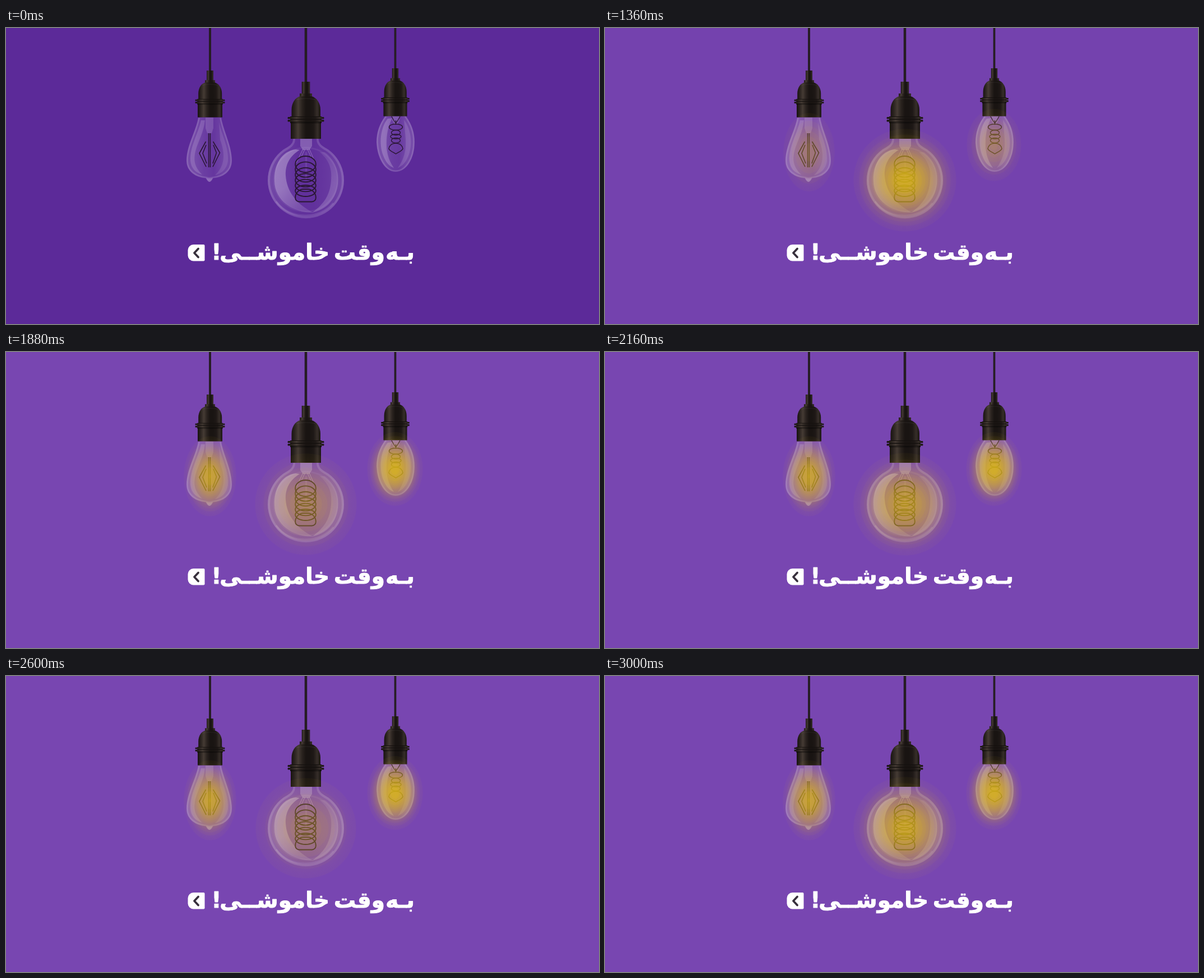
Recreate the animation shown at these times as an HTML page with a canvas. Size 1058 by 529 pixels, loop 3040 ms.

```html
<!DOCTYPE html>
<html lang="fa">
<head>
<meta charset="utf-8">
<title>Lamps</title>
<style>
html, body { margin: 0; width: 100%; height: 100%; overflow: hidden; background: #5c2a99; }
canvas { display: block; width: 100vw; height: 100vh; }
</style>
</head>
<body>
<canvas id="stage" width="1058" height="529"></canvas>
<script>
const ctx = document.getElementById('stage').getContext('2d');
const LOOP = 3040, STEP = 40, SWITCH_ON = 1120;
const DARK = [92, 42, 153], LIGHT = [120, 70, 177], YELLOW = '222,186,20';
// Brightness of the flickering middle lamp: [time, level]
const FLICKER = [[1120, 1], [1360, .9], [1640, .7], [1880, .48], [2160, .74],
  [2320, .88], [2600, .4], [2780, .56], [3000, .83], [3040, .86]];

const clamp = v => Math.max(0, Math.min(1, v));
const mix = (a, b, k) => a + (b - a) * k;
const white = a => `rgba(255,255,255,${a})`;

function keyed(keys, t) {
  for (let i = 1; i < keys.length; i++) {
    const [t0, a] = keys[i - 1], [t1, b] = keys[i];
    if (t <= t1) {
      const k = clamp((t - t0) / (t1 - t0));
      return mix(a, b, k * k * (3 - 2 * k));
    }
  }
  return keys[keys.length - 1][1];
}

function fill(d, style) {
  ctx.fillStyle = style;
  ctx.fill(new Path2D(d));
}

function stroke(d, style, width) {
  ctx.strokeStyle = style;
  ctx.lineWidth = width;
  ctx.stroke(new Path2D(d));
}

function ramp(x0, y0, x1, y1, ...colors) {
  const g = ctx.createLinearGradient(x0, y0, x1, y1);
  colors.forEach((c, i) => g.addColorStop(i / (colors.length - 1), c));
  return g;
}

function ring(x, y, rx, ry, style, width) {
  ctx.beginPath();
  ctx.ellipse(x, y, rx, ry, 0, 0, Math.PI * 2);
  ctx.strokeStyle = style;
  ctx.lineWidth = width;
  ctx.stroke();
}

function metal(w) {
  return ramp(-w, 0, w, 0, '#15100e', '#2a231f', '#453b34', '#2a231f', '#191412',
    '#191412', '#1e1816', '#362e29', '#15100e');
}

function socket(x, top, sx, sy, cord) {
  ctx.fillStyle = ramp(x - cord / 2, 0, x + cord / 2, 0, '#19111a', '#2d2426', '#19111a');
  ctx.fillRect(x - cord / 2, 0, cord, top + 1);
  ctx.save();
  ctx.translate(x, top);
  ctx.scale(sx, sy);
  ctx.fillStyle = metal(8);
  ctx.fillRect(-7.3, 0, 14.6, 22);
  ctx.fillStyle = metal(13);
  ctx.fillRect(-11, 21, 22, 6);
  fill('M-25.5 63V50C-25.5 38 -19 28 -10 26H10C19 28 26 38 26 50V63Z', metal(27));
  stroke('M-17 32Q0 28 17 32', white(.07), 1);
  ctx.fillStyle = '#14100e';
  ctx.fillRect(-28, 62, 56, 12);
  ctx.fillStyle = metal(33);
  ctx.beginPath();
  ctx.roundRect(-32.5, 63, 65, 3.6, 1.5);
  ctx.roundRect(-32.5, 68, 65, 3.6, 1.5);
  ctx.fill();
  ctx.fillStyle = metal(28);
  ctx.fillRect(-27, 72, 54, 30);
  ctx.fillStyle = 'rgba(0,0,0,.35)';
  ctx.fillRect(-27, 72, 54, 2.5);
  ctx.restore();
}

const WIRE = '#2a1733';

function pearLamp() {
  const glass = 'M343 160C339 184 322 210 322 237C322 257 339 267 356 268.5Q360 275 363 275Q366 275 370 268.5C387 267 403 257 403 237C403 210 388 184 384 160Z';
  fill(glass, ramp(322, 0, 403, 0, white(.16), white(.15), white(.09), white(.06), white(.12), white(.15)));
  stroke('M344.5 161C340.5 185 323.5 211 323.5 237C323.5 256 340 265.5 357 267Q363 269 369 267C386 265.5 401.5 256 401.5 237C401.5 211 386.5 185 382.5 161', white(.13), 2.6);
  fill('M348 165C343 189 328 211 329 237C330 251 339 259 350 262C337 249 334 238 338 220C343 202 353 186 355 165Z', white(.15));
  fill('M380 167C384 190 398 213 396 238C394 252 385 260 373 263C390 247 392 226 382 200Z', white(.1));
  fill('M357 268Q363 270 369 268Q366 275 363 275Q360 275 357 268Z', white(.25));
  fill('M356 160H370V179L367 188H359L356 179Z', white(.14));
  stroke('M361.6 188V249M364.4 188V249M356.5 203L345 224L357 248M357 209L351 224L358 242M369.5 203L381.5 223L369 248M370 209L375.5 223L369 242', WIRE, 1.6);
  socket(364, 76, .815, .82, 3.8);
}

function globeLamp() {
  const glass = 'M513 197C513 208 505 211 495 217A68 68 0 1 0 575 217C565 211 557 208 557 197Z';
  fill(glass, ramp(467, 0, 603, 0, white(.15), white(.09), white(.03), white(.03), white(.07), white(.15)));
  stroke('M514 198C514 209 506 213 496 219A66 66 0 1 0 574 219C564 213 556 209 556 198', white(.13), 4);
  ring(535, 271, 57, 57, white(.06), 3);
  fill('M517 217C491 220 478 245 479 274C480 308 511 330 548 330C519 315 501 293 499 264C498 244 506 229 524 218Z',
    ramp(478, 230, 535, 330, white(.3), white(.28), white(.12)));
  fill('M569 222C588 237 594 257 592 278C589 307 571 325 546 330C567 315 578 299 580 273C582 252 577 237 560 222Z',
    ramp(0, 222, 0, 330, white(.08), white(.15), white(.18)));
  stroke('M482 310Q502 336 536 335Q565 334 584 313', white(.1), 3);
  fill('M525 198H546V211L541 218H530L525 211Z', white(.22));
  stroke('M530 216L518 241M533 217L527 230M538 217L544 230M541 216L552 241', white(.3), 1);
  fill('M534 222H537V272H534Z', white(.08));
  for (let i = 0; i < 6; i++) ring(534.5, 243.5 + i * 9.5, 18.3, 14.5 - i * .9, WIRE, 1.9);
  ctx.beginPath();
  ctx.roundRect(516.2, 288, 36.6, 22.5, [15, 15, 7, 7]);
  ctx.stroke();
  socket(535, 96, 1, 1, 4.4);
}

function ovalLamp() {
  const glass = 'M677 157C665 173 661 188 661 204C662 234 677 257 695 257C714 257 729 234 729 204C729 188 725 173 713 157Z';
  fill(glass, ramp(661, 0, 729, 0, white(.18), white(.17), white(.09), white(.07), white(.15), white(.17)));
  stroke('M678 158C666 174 662.5 188 662.5 204C664 233 678 255.5 695 255.5C713 255.5 727.5 233 727.5 204C727.5 188 724 174 712 158', white(.13), 2.5);
  fill('M681 162C668 178 665 207 673 228C678 241 684 247 692 250C681 234 678 218 679 200C680 184 683 174 689 161Z', white(.2));
  fill('M710 164C724 182 727 214 715 235C710 244 704 248 699 250C710 235 714 219 713 199Z', white(.12));
  fill('M689 157H702V165L698 172H693L689 165Z', white(.15));
  stroke('M688 158Q692 166 695.5 170Q699 166 703 158M695.5 165V173', WIRE, 1.3);
  ring(695.5, 177, 12, 5.5, WIRE, 1.4);
  ring(695.5, 187, 8, 4.5, WIRE, 1.4);
  ring(695.5, 194, 9.5, 4.2, WIRE, 1.4);
  ring(695.5, 201, 8, 4.5, WIRE, 1.4);
  stroke('M695.5 206C704 206 708 212 708 216C706 220 700 222 695.5 225C691 222 685 220 683 216C683 212 687 206 695.5 206Z', WIRE, 1.5);
  socket(694.5, 72, .78, .84, 3.6);
}

// Soft light with faint steps toward the rim
function glow(x, y, rx, ry, level) {
  if (level <= 0) return;
  const g = ctx.createRadialGradient(0, 0, 0, 0, 0, 1);
  for (let i = 0; i <= 96; i++) {
    const r = i / 96;
    const smooth = .95 * level * Math.pow(1 - r * r, 2);
    const stepped = Math.ceil(smooth * 16 - .1) / 16;
    g.addColorStop(r, `rgba(${YELLOW},${i === 96 ? 0 : clamp(mix(smooth, stepped, .5))})`);
  }
  ctx.save();
  ctx.translate(x, y);
  ctx.scale(rx, ry);
  ctx.fillStyle = g;
  ctx.beginPath();
  ctx.arc(0, 0, 1, 0, Math.PI * 2);
  ctx.fill();
  ctx.restore();
}

// Picks the number of kashidas that fits the word's space best
function word(head, tail, left, right) {
  const make = n => head + 'ـ'.repeat(n) + tail;
  const miss = n => Math.abs(ctx.measureText(make(n)).width - (right - left));
  let n = 0;
  while (n < 6 && miss(n + 1) < miss(n)) n++;
  ctx.fillText(make(n), right, 414);
  ctx.strokeText(make(n), right, 414);
}

function caption() {
  ctx.font = 'bold 39px "DejaVu Sans", sans-serif';
  ctx.fillStyle = ctx.strokeStyle = '#fff';
  ctx.lineWidth = 1;
  ctx.direction = 'rtl';
  ctx.textAlign = 'right';
  word('ب', 'ه', 684, 729);
  word('وق', 'ت', 584, 676);
  word('خاموش', 'ی', 383, 577);
  ctx.direction = 'ltr';
  ctx.textAlign = 'center';
  ctx.fillText('!', 375.5, 414);
  ctx.strokeText('!', 375.5, 414);

  ctx.beginPath();
  ctx.roundRect(324.5, 387, 30, 29.5, [10, 2, 2, 10]);
  ctx.fill();
  ctx.lineCap = 'round';
  stroke('M343 394.5L336 402L343 409.5', '#37303c', 3.8);
  ctx.lineCap = 'butt';
}

function draw(t) {
  const on = t >= SWITCH_ON;
  const day = clamp((t - SWITCH_ON) / 276);
  const side = clamp((t - SWITCH_ON) / 520);
  ctx.lineJoin = 'round';
  ctx.fillStyle = `rgb(${DARK.map((c, i) => Math.round(mix(c, LIGHT[i], day)))})`;
  ctx.fillRect(0, 0, 1058, 529);
  pearLamp();
  globeLamp();
  ovalLamp();
  glow(364, 222, 49, 75, side * .8);
  glow(694, 209, 52, 69, side * .9);
  if (on) glow(535, 272, 96, 96, keyed(FLICKER, t));
  caption();
}

const start = performance.now();
function tick() {
  const t = (performance.now() - start) % LOOP;
  draw(Math.floor(t / STEP) * STEP);
  requestAnimationFrame(tick);
}
tick();
</script>
</body>
</html>
```
